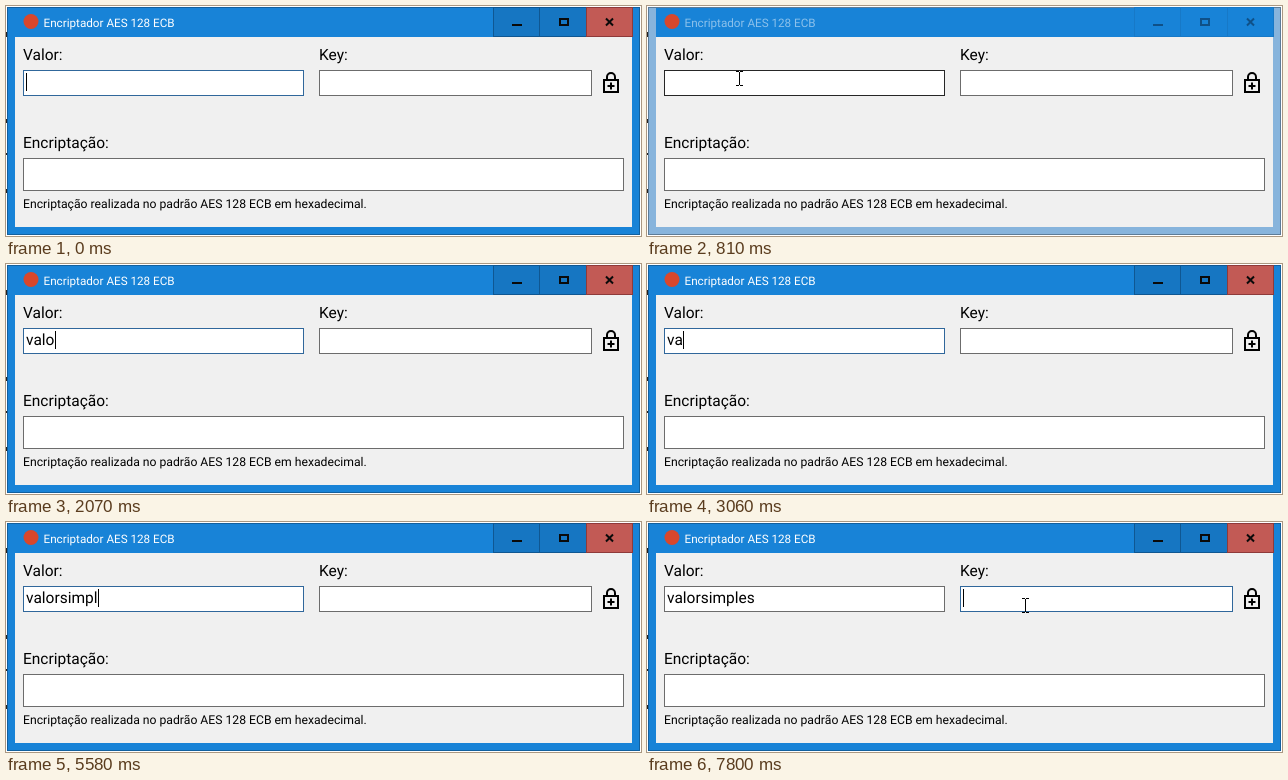
An HTML page that plays this animation: 635 by 230 pixels, repeating every 8000 ms.

```html
<!DOCTYPE html>
<html lang="pt">
<head>
<meta charset="utf-8">
<title>Encriptador AES 128 ECB</title>
<style>
  html, body { margin: 0; width: 100%; height: 100%; overflow: hidden; background: #fff; }
  svg { display: block; font-family: Roboto, sans-serif; font-size: 15.5px; text-rendering: geometricPrecision; }
  .crisp { shape-rendering: crispEdges; }
  .frame { fill: #1883d7; stroke: #12609e; }
  .title { fill: #fff; font-size: 11.7px; }
  .button { fill: #1676c2; stroke: #0f5792; }
  .close { fill: #c25a55; stroke: #8e3a3a; }
  .glyph { fill: none; stroke: #0a0a0a; stroke-width: 2; }
  .field { fill: #fff; stroke: #6c6c6c; }
  .field.hover { stroke: #262626; }
  .field.focus { stroke: #30679b; }
  .inactive .frame { fill: #87b4dc; stroke: #5c7c98; }
  .inactive .title { fill: #8cc1eb; }
  .inactive .button { fill: #1883d7; stroke: #1779c7; }
  .inactive .glyph { stroke: #0f5087; }
</style>
</head>
<body>
<svg id="stage" width="635" height="230" viewBox="0 0 635 230">
  <path class="crisp" d="M0 26h1v5h-1zM0 113h1v4h-1zM0 147h1v2h-1zM0 183h1v4h-1z" fill="#222"/>

  <g class="crisp">
    <rect class="frame" x="1.5" y="1.5" width="632" height="227"/>
    <rect x="9" y="2" width="617" height="29" fill="#1883d7"/>
    <rect x="9" y="31" width="617" height="190" fill="#f0f0f0"/>
    <rect class="button" x="487.5" y="1.5" width="46" height="29"/>
    <rect class="button" x="533.5" y="1.5" width="47" height="29"/>
    <rect class="button close" x="580.5" y="1.5" width="46" height="29"/>
    <path class="glyph" d="M506 19h10M554 13h8v6h-8z"/>
  </g>
  <path class="glyph" d="M600 12.5l7 7M607 12.5l-7 7"/>
  <circle cx="25" cy="15.5" r="7.5" fill="#d8472c"/>
  <text class="title" x="37.5" y="21">Encriptador AES 128 ECB</text>

  <text x="17" y="54">Valor:</text>
  <text x="313" y="54">Key:</text>
  <text x="17" y="142">Encriptação:</text>
  <text x="17" y="202" font-size="12.2">Encriptação realizada no padrão AES 128 ECB em hexadecimal.</text>
  <g class="crisp">
    <rect id="valueField" class="field" x="17.5" y="64.5" width="280" height="25"/>
    <rect id="keyField" class="field" x="313.5" y="64.5" width="272" height="25"/>
    <rect class="field" x="17.5" y="152.5" width="600" height="32"/>
  </g>
  <text id="value" x="20" y="81"></text>
  <rect id="caret" class="crisp" y="67" width="1" height="18"/>

  <g fill="none" stroke="#000" stroke-width="2">
    <path d="M598 74h14v12h-14zM601 74v-3a4 4 0 0 1 8 0v3M605 76.500v7M601.500 80h7"/>
  </g>

  <path id="beam" class="crisp" d="M-3-8h3v1h1v-1h3v1h-3v13h3v1h-3v-1h-1v1h-3v-1h3v-13h-3z"/>
  <path id="arrow" d="M.5.5v16l3.700-3.600 2.500 5.600 2.300-1-2.400-5.500h5.200z" fill="#fff" stroke="#000"/>
</svg>
<script>
const LOOP = 8000;
const $ = id => document.getElementById(id);

// Whole-pixel advances give the caret position after each letter.
const ADVANCE = { v: 8, a: 8, l: 4, o: 9, r: 5, s: 8, i: 4, m: 13, p: 9, e: 8 };

const typing = [
  [0, ''], [1740, 'v'], [1940, 'va'], [2070, 'valo'], [2200, 'valos'], [2400, 'valosr'],
  [2600, 'valos'], [2800, 'valo'], [2930, 'val'], [3060, 'va'], [3390, 'val'], [3520, 'valo'],
  [4000, 'valor'], [4660, 'valo'], [4790, 'valor'], [5120, 'valors'], [5250, 'valorsi'],
  [5380, 'valorsim'], [5580, 'valorsimpl'], [5650, 'valorsimple'], [5850, 'valorsimples']
];
const caretHidden = [[260, 1080], [1610, 1740], [4530, 4660], [6380, 6910]];

const within = (t, [from, to]) => t >= from && t < to;
const mix = (a, b, k) => a + (b - a) * k;
const easeOut = k => 1 - (1 - k) ** 2;
const easeInOut = k => k * k * (3 - 2 * k);

// The pointer is sampled every 70 ms, like the rest of the recording.
function progress(t, from, to) {
  const sampled = from + Math.floor((t - from) / 70) * 70;
  return Math.min(1, Math.max(0, sampled / (to - from) - from / (to - from)));
}

function pointerAt(t) {
  if (within(t, [390, 1740])) {
    const k = easeOut(progress(t, 390, 880));
    return [mix(330, 87, k), mix(229, 70, k)];
  }
  if (within(t, [6980, 7260])) {
    const k = progress(t, 6980, 7260);
    return [mix(87, 246, k), mix(70, 119, easeOut(k))];
  }
  if (t >= 7260) {
    const k = progress(t, 7260, 7680);
    return [mix(246, 378, easeOut(k)), mix(119, 84, easeInOut(k))];
  }
  return null;
}

const inside = (point, left, right) =>
  !!point && point[0] >= left && point[0] < right && point[1] >= 64 && point[1] < 90;

function show(element, visible, point) {
  element.setAttribute('visibility', visible ? 'visible' : 'hidden');
  if (visible) element.setAttribute('transform', `translate(${point.map(Math.round)})`);
}

function styleField(field, focused, hovered) {
  field.setAttribute('class', 'field' + (focused ? ' focus' : hovered ? ' hover' : ''));
}

function render(t) {
  const active = !within(t, [260, 1080]);
  const keyFocused = t >= 7800;
  const text = typing.findLast(([time]) => time <= t)[1];
  const point = pointerAt(t);
  const overValue = inside(point, 17, 298);
  const overKey = inside(point, 313, 586);

  $('stage').setAttribute('class', active ? '' : 'inactive');
  styleField($('valueField'), active && !keyFocused, overValue);
  styleField($('keyField'), keyFocused, overKey);
  $('value').textContent = text;

  const caretX = keyFocused ? 316 : [...text].reduce((x, letter) => x + ADVANCE[letter], 20);
  show($('caret'), !caretHidden.some(span => within(t, span)), [caretX, 0]);
  show($('beam'), overValue || overKey, point);
  show($('arrow'), point && !overValue && !overKey, point);
}

function tick() {
  render(performance.now() % LOOP);
  requestAnimationFrame(tick);
}
tick();
</script>
</body>
</html>
```
